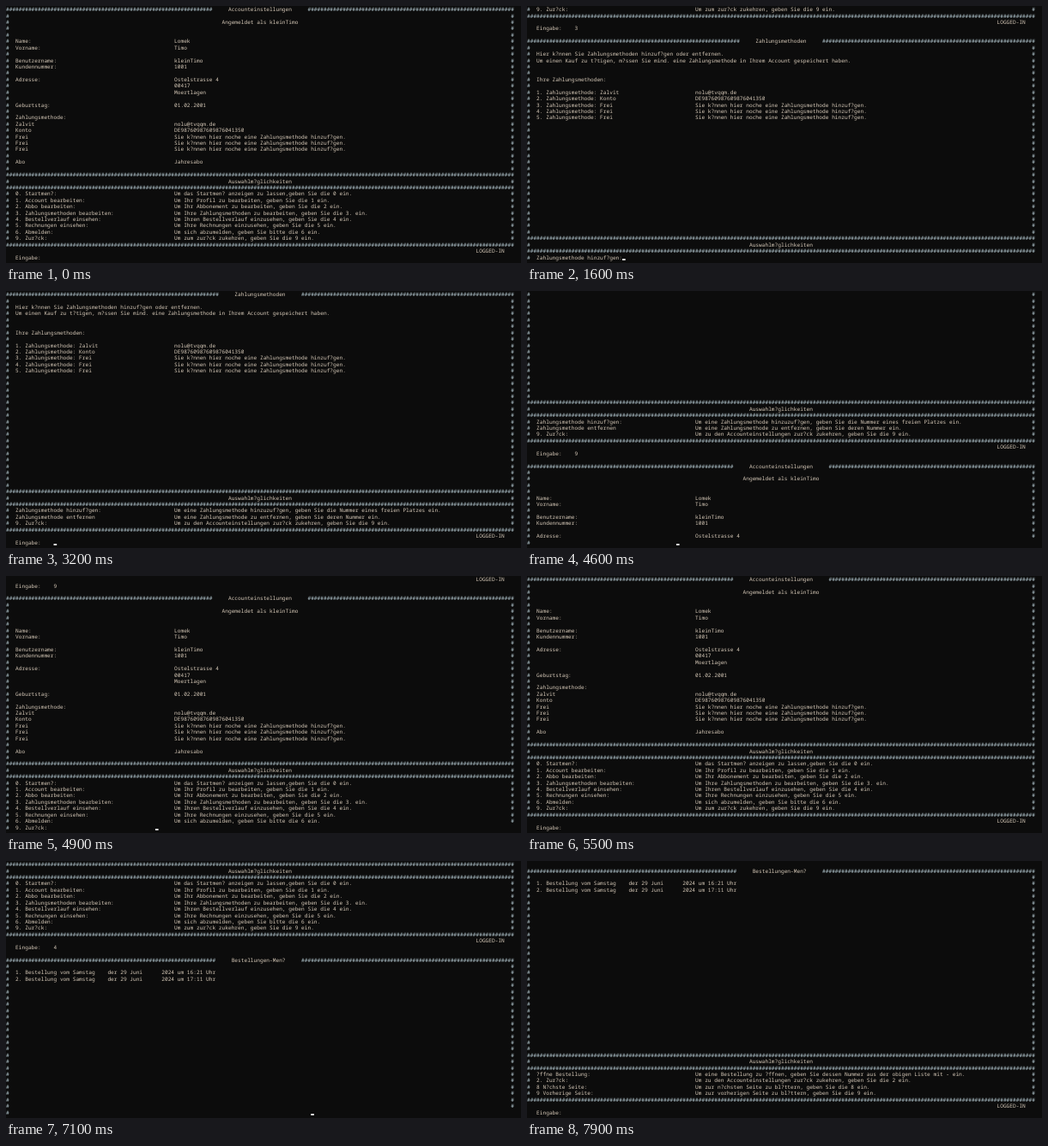
Write an HTML page with a canvas that moves like this. It is 600x300 px and loops after 8 s.

```html
<!DOCTYPE html>
<html lang="de">
<head>
<meta charset="utf-8">
<title>Konsole</title>
<style>
  html, body { margin: 0; width: 100%; height: 100%; overflow: hidden; background: #0c0c0c; }
  canvas { display: block; }
</style>
</head>
<body>
<canvas id="stage" width="600" height="300"></canvas>
<script>
const COLS = 160, ROWS = 40;
const CELL_W = 3.7, CELL_H = 7.42, BASELINE = 6.2;
const LOOP = 8000, STEP = 100;
const LINES_PER_MS = 0.08, BLINK = 530;
const PAPER = '#0c0c0c', INK = '#d6c9b8', HASH = '#b4c8d0', CURSOR = '#f2f2f2';

const rule = '#'.repeat(COLS);
const boxed = text => '#' + ('  ' + text).padEnd(COLS - 2) + '#';
const pair = (left, right) => left.padEnd(50) + right;
const centre = text => ' '.repeat((COLS - 6 - text.length) / 2) + text;

function heading(title) {
  const side = Math.floor((COLS - title.length - 10) / 2);
  return ('#'.repeat(side) + '     ' + title + '     ').padEnd(COLS, '#');
}

function page(title, height, body, options) {
  const filled = Array.from({ length: height }, (_, i) => boxed(body[i] || ''));
  return [
    heading(title), ...filled,
    rule, boxed(centre('Auswahlm?glichkeiten')), rule,
    ...options.map(o => boxed(pair(...o))),
    rule, ' '.repeat(148) + 'LOGGED-IN', '   Eingabe:    '
  ];
}

const mail = 'nolu@tvqqm.de', iban = 'DE98760987609876041350', payService = 'Zalvit';
const free = 'Sie k?nnen hier noche eine Zahlungsmethode hinzuf?gen.';

const account = page('Accounteinstellungen', 25, [
  '', centre('Angemeldet als kleinTimo'), '', '',
  pair('Name:', 'Lomek'),
  pair('Vorname:', 'Timo'),
  '',
  pair('Benutzername:', 'kleinTimo'),
  pair('Kundennummer:', '1001'),
  '',
  pair('Adresse:', 'Ostelstrasse 4'),
  pair('', '00417'),
  pair('', 'Moertlagen'),
  '',
  pair('Geburtstag:', '01.02.2001'),
  '',
  'Zahlungsmethode:',
  pair(payService, mail),
  pair('Konto', iban),
  pair('Frei', free), pair('Frei', free), pair('Frei', free),
  '',
  pair('Abo', 'Jahresabo')
], [
  ['0. Startmen?:', 'Um das Startmen? anzeigen zu lassen,geben Sie die 0 ein.'],
  ['1. Account bearbeiten:', 'Um Ihr Profil zu bearbeiten, geben Sie die 1 ein.'],
  ['2. Abbo bearbeiten:', 'Um Ihr Abbonement zu bearbeiten, geben Sie die 2 ein.'],
  ['3. Zahlungsmethoden bearbeiten:', 'Um Ihre Zahlungsmethoden zu bearbeiten, geben Sie die 3. ein.'],
  ['4. Bestellverlauf einsehen:', 'Um Ihren Bestellverlauf einzusehen, geben Sie die 4 ein.'],
  ['5. Rechnungen einsehen:', 'Um Ihre Rechnungen einzusehen, geben Sie die 5 ein.'],
  ['6. Abmelden:', 'Um sich abzumelden, geben Sie bitte die 6 ein.'],
  ['9. Zur?ck:', 'Um zum zur?ck zukehren, geben Sie die 9 ein.']
]);

const payment = page('Zahlungsmethoden', 30, [
  '',
  'Hier k?nnen Sie Zahlungsmethoden hinzuf?gen oder entfernen.',
  'Um einen Kauf zu t?tigen, m?ssen Sie mind. eine Zahlungsmethode in Ihrem Account gespeichert haben.',
  '', '',
  'Ihre Zahlungsmethoden:',
  '',
  pair('1. Zahlungsmethode: ' + payService, mail),
  pair('2. Zahlungsmethode: Konto', iban),
  ...[3, 4, 5].map(n => pair(n + '. Zahlungsmethode: Frei', free))
], [
  ['Zahlungsmethode hinzuf?gen:', 'Um eine Zahlungsmethode hinzuzuf?gen, geben Sie die Nummer eines freien Platzes ein.'],
  ['Zahlungsmethode entfernen', 'Um eine Zahlungsmethode zu entfernen, geben Sie deren Nummer ein.'],
  ['9. Zur?ck:', 'Um zu den Accounteinstellungen zur?ck zukehren, geben Sie die 9 ein.']
]);

const orders = page('Bestellungen-Men?', 28, [
  '',
  '1. Bestellung vom Samstag    der 29 Juni      2024 um 16:21 Uhr',
  '2. Bestellung vom Samstag    der 29 Juni      2024 um 17:11 Uhr'
], [
  ['?ffne Bestellung:', 'Um eine Bestellung zu ?ffnen, geben Sie dessen Nummer aus der obigen Liste mit - ein.'],
  ['2. Zur?ck:', 'Um zu den Accounteinstellungen zur?ck zukehren, geben Sie die 2 ein.'],
  ['8 N?chste Seite:', 'Um zur n?chsten Seite zu bl?ttern, geben Sie die 8 ein.'],
  ['9 Vorherige Seite:', 'Um zur vorherigen Seite zu bl?ttern, geben Sie die 9 ein.']
]);

// Each step: a key is typed, then the next page is printed below.
const steps = [
  { key: '3', typed: 700, start: 1160.12, lines: ['', ...payment] },
  { key: '9', typed: 3900, start: 4433.8, lines: ['', ...account] },
  { key: '4', typed: 6300, start: 6780, lines: ['', ...orders] }
];

function consoleAt(t) {
  let log = [...account], blinkFrom = 100, printing = false;
  for (const { key, typed, start, lines } of steps) {
    if (t >= typed) log[log.length - 1] += key;
    if (t < start) break;
    const done = (t - start) * LINES_PER_MS, whole = Math.floor(done);
    log.push(...lines.slice(0, whole));
    printing = whole < lines.length;
    if (printing) log.push(lines[whole].slice(0, Math.floor((done - whole) * COLS)));
    blinkFrom = start + lines.length / LINES_PER_MS;
  }
  const cursorOn = printing || (Math.floor((t - blinkFrom) / BLINK) & 1) === 0;
  return { rows: log.slice(-ROWS), cursorOn };
}

const ctx = document.getElementById('stage').getContext('2d');

function write(text, row, color) {
  if (!text.trim()) return;
  ctx.fillStyle = color;
  ctx.fillText(text, 0, (row * CELL_H + BASELINE) * 10);
}

function draw(t) {
  const { rows, cursorOn } = consoleAt(t);
  ctx.setTransform(1, 0, 0, 1, 0, 0);
  ctx.fillStyle = PAPER;
  ctx.fillRect(0, 0, 600, 300);

  // A large font scaled down keeps the column pitch fractional.
  ctx.setTransform(0.1, 0, 0, 0.1, 0, 0);
  ctx.font = '61.667px "Noto Sans Mono", "Liberation Mono", monospace';
  ctx.textRendering = 'geometricPrecision';
  rows.forEach((line, row) => {
    write(line.replace(/[^#]/g, ' '), row, HASH);
    write(line.replace(/#/g, ' '), row, INK);
  });

  if (cursorOn) {
    const last = rows.length - 1;
    ctx.setTransform(1, 0, 0, 1, 0, 0);
    ctx.fillStyle = CURSOR;
    ctx.fillRect(rows[last].length * CELL_W, last * CELL_H + 5.7, CELL_W, 1.8);
  }
}

let origin = null, shown = -1;
function tick(now) {
  if (origin === null) origin = now;
  const t = Math.floor(((now - origin) % LOOP) / STEP) * STEP;
  if (t !== shown) draw(shown = t);
  requestAnimationFrame(tick);
}
draw(0);
requestAnimationFrame(tick);
</script>
</body>
</html>
```
